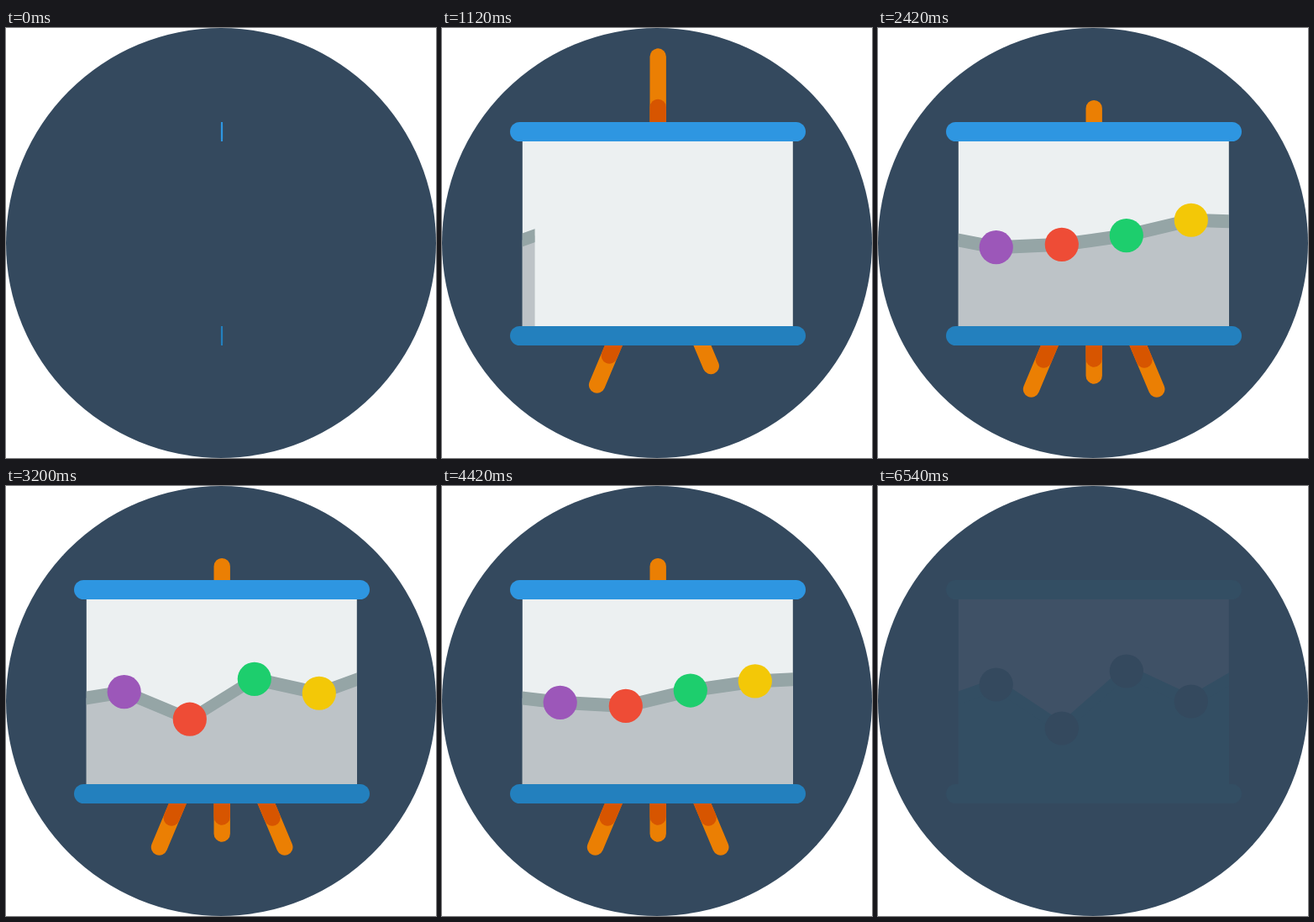
Animation, 512 px wide and 512 px high, one loop 7.2 s. Source, as an HTML page:

```html
<!DOCTYPE html>
<html lang="en">
<head>
<meta charset="utf-8">
<title>Presentation board</title>
<style>
  html, body { margin: 0; width: 100%; height: 100%; overflow: hidden; background: #fff; }
  svg { display: block; width: 100vw; height: 100vh; }
  .disc { fill: #34495e; }
  .stick { stroke: #eb7f03; stroke-width: 19.4; stroke-linecap: round; }
  .stick .shade { stroke: #d75500; }
  .paper { fill: #ecf0f1; }
  .top { fill: #2e96e1; }
  .bottom { fill: #2380be; }
  .area { fill: #bdc3c7; }
  .trend { fill: #95a5a6; }
  /* faint trace that stays after the fade */
  .trace .stick { display: none; }
  .trace .paper { fill: #3f5166; }
  .trace .bar, .trace .area, .trace .trend { fill: #334e63; }
  .trace .dot { fill: #34495e; }
</style>
</head>
<body>
<svg viewBox="0 0 512 512">
  <defs>
    <clipPath id="reveal"><rect id="wipe" x="95.5" y="135" width="0" height="220"/></clipPath>
  </defs>
  <circle class="disc" cx="256" cy="256" r="256"/>
  <g id="scene">
    <g class="stick" id="left">
      <path d="M228.7 320L182.5 430"/><path class="shade" d="M228.7 320L197.2 395"/>
    </g>
    <g class="stick" id="right">
      <path d="M285.6 320L331.8 430"/><path class="shade" d="M285.6 320L317.1 395"/>
    </g>
    <g class="stick" id="pole">
      <path d="M257.2 95.7V414"/><path class="shade" d="M257.2 94V394" id="poleShade"/>
    </g>
    <rect class="paper" id="paper" x="95.8" y="134" width="322" height="222"/>
    <g clip-path="url(#reveal)">
      <path class="area" id="area"/>
      <path class="trend" id="trend"/>
    </g>
    <g id="dots"></g>
    <g id="bars">
      <rect class="bar top" x="81" y="112" width="352" height="23" rx="11.5"/>
      <rect class="bar bottom" x="81" y="355" width="352" height="23" rx="11.5"/>
    </g>
  </g>
</svg>
<script>
const LOOP = 7200;
const $ = id => document.getElementById(id);
const set = (el, name, value) => el.setAttribute(name, value);

// resting height, travel at full swing
const points = [
  { x: 140.7, y: 236.5, swing: 51, fill: '#9c57b9' },
  { x: 218.8, y: 288.5, swing: -63.5, fill: '#ee4c36' },
  { x: 295.8, y: 220.5, swing: 55, fill: '#1dce6d' },
  { x: 372.8, y: 256.5, swing: -57.5, fill: '#f3c807' }
];
for (const p of points) {
  p.el = document.createElementNS('http://www.w3.org/2000/svg', 'circle');
  set(p.el, 'class', 'dot');
  set(p.el, 'cx', p.x);
  set(p.el, 'fill', p.fill);
  $('dots').append(p.el);
}
set($('poleShade'), 'd', 'M257.2 156V394');

const progress = (t, start, length) => Math.min(1, Math.max(0, (t - start) / length));
const quadOut = p => 1 - (1 - p) ** 2;
const sineInOut = p => (1 - Math.cos(Math.PI * p)) / 2;
const backOut = p => 1 + 2.70158 * (p - 1) ** 3 + 1.70158 * (p - 1) ** 2;

// two swings of the chart, the last return slower
function swingAt(t) {
  if (t < 2610) return sineInOut(progress(t, 2240, 370));
  if (t < 3420) return 1 - sineInOut(progress(t, 2610, 810));
  if (t < 3780) return sineInOut(progress(t, 3420, 360));
  return 1 - sineInOut(progress(t, 3780, 1290) ** 0.85);
}

function slide(id, t, start, shown, dx, dy) {
  const away = 85 * (1 - quadOut(progress(t, start, 600)));
  set($(id), 'transform', `translate(${dx * away} ${dy * away})`);
  set($(id), 'visibility', t >= shown ? 'visible' : 'hidden');
}

function drawChart(t) {
  const u = swingAt(t);
  const line = [[95.5, 252.4], ...points.map(p => [p.x, p.y + p.swing * u]), [418, 230.3]];
  const shift = d => line.map(([x, y]) => `${x} ${y + d}`);
  set($('area'), 'd', `M${line.join('L')}V356H95.5Z`);
  set($('trend'), 'd', `M${shift(-8).join('L')}L${shift(8).reverse().join('L')}Z`);
  set($('wipe'), 'width', 322.5 * quadOut(progress(t, 1104, 720)));
  points.forEach((p, i) => {
    set(p.el, 'cy', p.y + p.swing * u);
    set(p.el, 'r', 20.1 * Math.max(0, backOut(progress(t, 1480 + 100 * i, 440))));
  });
}

function draw(t) {
  const wide = Math.max(0, backOut(progress(t, 0, 740)));
  set($('bars'), 'transform', `translate(257 0) scale(${wide} 1) translate(-257 0)`);
  set($('paper'), 'height', 222 * quadOut(progress(t, 400, 400)));
  slide('left', t, 672, 740, 0.388, -0.922);
  slide('right', t, 876, 876, -0.388, -0.922);
  slide('pole', t, 1032, 1032, 0, -1);
  drawChart(t);
  const trace = t >= 6540;
  $('scene').classList.toggle('trace', trace);
  for (const p of points) set(p.el, 'fill', trace ? '#34495e' : p.fill);
  set($('scene'), 'opacity', trace ? 1 : 1 - sineInOut(progress(t, 6000, 600)));
}

const begin = performance.now();
function tick() {
  draw((performance.now() - begin) % LOOP);
  requestAnimationFrame(tick);
}
draw(0);
requestAnimationFrame(tick);
</script>
</body>
</html>
```
